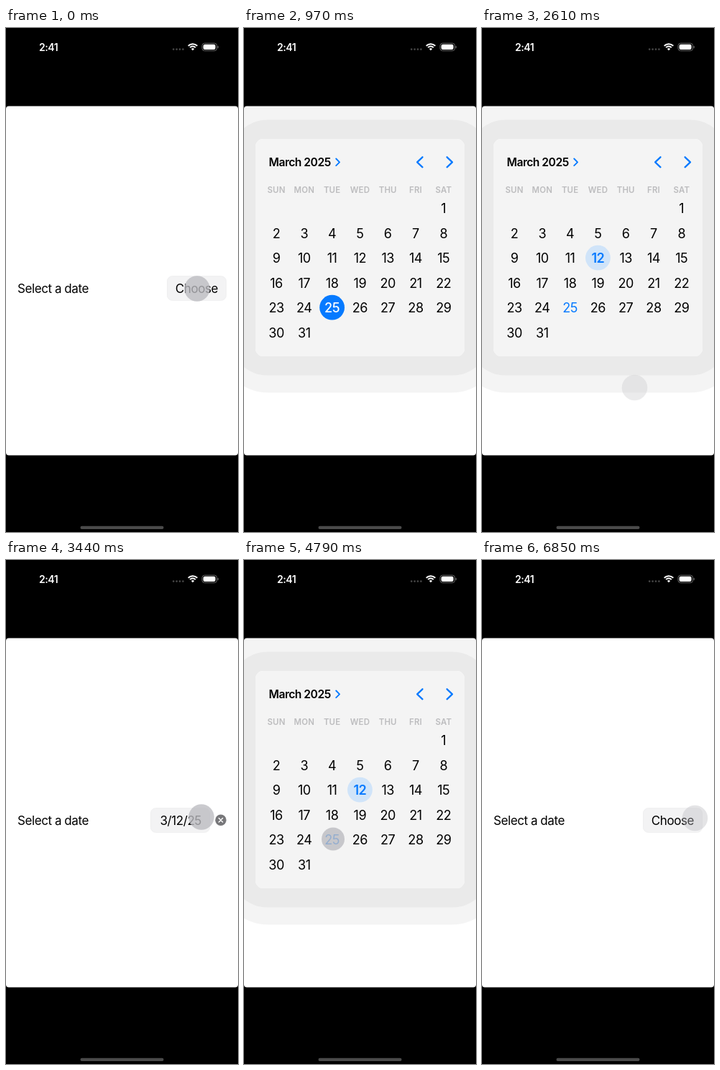
An HTML page with a canvas for the animation above (9110 ms loop, 323 by 700 pixels).

```html
<!DOCTYPE html>
<html lang="en">
<head>
<meta charset="utf-8">
<title>Date picker</title>
<style>
  html, body { margin: 0; width: 100%; height: 100%; overflow: hidden; background: #000; }
  canvas { display: block; width: 323px; height: 700px; }
</style>
</head>
<body>
<canvas id="stage"></canvas>
<script>
const W = 323, H = 700, LOOP = 9110, REST = 6850;
const BLUE = '#067aff';
const FONT = 'Inter, Roboto, "Liberation Sans", sans-serif';
const canvas = document.getElementById('stage');
const ctx = canvas.getContext('2d');
const dpr = window.devicePixelRatio || 1;
canvas.width = W * dpr;
canvas.height = H * dpr;

const touches = [
  { x: 266, y: 362, from: -200, to: 330 },
  { x: 161, y: 320, from: 1500, to: 2200 },
  { x: 212.5, y: 499.5, from: 2556, to: 3180 },
  { x: 272, y: 357, from: 3260, to: 3820 },
  { x: 124, y: 387.5, from: 4420, to: 5100, r: 16 },
  { x: 199.5, y: 467, from: 5350, to: 6180 },
  { x: 296.5, y: 358.5, from: 6280, to: 6972 }
];
// The calendar opens and closes in turn
const toggles = [550, 2805, 3690, 5575];

const clamp = v => Math.max(0, Math.min(1, v));
const ramp = (t, at, span) => clamp((t - at) / span);

// 1 = folded away, 0 = fully open
function foldAt(t) {
  const i = toggles.filter(at => at <= t).length - 1;
  if (i < 0) return 1;
  const left = (1 - ramp(t, toggles[i], 420)) ** 1.6;
  return i % 2 ? 1 - left : left;
}

// Parabola through a at 0, b at .5 and c at 1
function curve(p, a, b, c) {
  return a * (1 - p) * (1 - 2 * p) + b * 4 * p * (1 - p) + c * p * (2 * p - 1);
}

function box(x, y, w, h, r, fill, stroke) {
  ctx.beginPath();
  ctx.roundRect(x, y, w, h, r);
  if (fill) { ctx.fillStyle = fill; ctx.fill(); }
  if (stroke) { ctx.strokeStyle = stroke; ctx.lineWidth = 1; ctx.stroke(); }
}

function disc(x, y, r, fill) {
  ctx.beginPath();
  ctx.arc(x, y, r, 0, Math.PI * 2);
  ctx.fillStyle = fill;
  ctx.fill();
}

function stroke(color, width) {
  ctx.strokeStyle = color;
  ctx.lineWidth = width;
  ctx.lineCap = ctx.lineJoin = 'round';
  ctx.stroke();
}

// dir 1 points right, -1 left
function chevron(x, y, w, h, dir, width) {
  ctx.beginPath();
  ctx.moveTo(x - dir * w, y - h);
  ctx.lineTo(x + dir * w, y);
  ctx.lineTo(x - dir * w, y + h);
  stroke(BLUE, width);
}

// y is the middle of the capitals
function label(str, x, y, size, color, { weight = 400, align = 'left', space = -.43 } = {}) {
  ctx.font = `${weight} ${size}px ${FONT}`;
  ctx.letterSpacing = space + 'px';
  ctx.textAlign = align;
  ctx.fillStyle = color;
  ctx.fillText(str, x, y + size * .364);
}

function statusBar() {
  label('2:41', 46, 26.5, 14, '#fff', { weight: 600 });
  for (let i = 0; i < 4; i++) disc(233.2 + i * 4.4, 29.6, 1.3, '#484848');
  ctx.strokeStyle = '#fff';
  ctx.lineCap = 'butt';
  ctx.lineWidth = 2;
  for (const r of [8.6, 5.3]) {
    ctx.beginPath();
    ctx.arc(260, 30.8, r, -Math.PI * .76, -Math.PI * .24);
    ctx.stroke();
  }
  ctx.beginPath();
  ctx.moveTo(260, 31.2);
  ctx.arc(260, 31.2, 3, -Math.PI * .75, -Math.PI * .25);
  ctx.fillStyle = '#fff';
  ctx.fill();
  box(273, 21.2, 20.6, 10.4, 3.4, null, '#6a6a6a');
  box(274.6, 22.8, 17, 7.2, 2.2, '#fff');
  box(294.6, 24.8, 1.2, 3.4, .6, '#6a6a6a');
}

function button(str, x, right) {
  box(x + .5, 344.7, right - x - 1, 33.6, 7, '#f3f3f4', '#efeff0');
  label(str, right - 12, 362, 17, '#000', { align: 'right' });
}

function clearButton(x, y, arm) {
  disc(x, y, 7.7, '#77777a');
  ctx.beginPath();
  for (const k of [-arm, arm]) {
    ctx.moveTo(x - arm, y - k);
    ctx.lineTo(x + arm, y + k);
  }
  stroke('#fff', 1.4);
}

function sheet() {
  ctx.beginPath();
  ctx.roundRect(0, 108.5, W, 485, 4);
}

function page(day, dateOn) {
  sheet();
  ctx.fillStyle = '#fff';
  ctx.fill();
  label('Select a date', 16, 362, 17, '#000');
  ctx.globalAlpha = 1 - dateOn;
  button('Choose', 224, 307);
  ctx.globalAlpha = dateOn;
  button(`3/${day}/25`, day === 12 ? 201 : 198, 284);
  clearButton(299, 361.3, 2.7);
  ctx.globalAlpha = 1;
}

function month(selected) {
  label('March 2025', 34.5, 186.3, 15.6, '#000', { weight: 600, space: -.48 });
  chevron(130.6, 186.3, 2.4, 4.8, 1, 1.9);
  chevron(244.8, 186.3, 3.7, 7, -1, 2.3);
  chevron(286.3, 186.3, 3.7, 7, 1, 2.3);
  const colX = c => 45 + c * 38.8;
  'SUN MON TUE WED THU FRI SAT'.split(' ').forEach((name, c) =>
    label(name, colX(c), 225, 11.4, '#bcbcbe', { weight: 600, align: 'center', space: .2 }));
  for (let d = 1; d <= 31; d++) {
    const cell = d + 5;
    const x = colX(cell % 7), y = 250.5 + Math.floor(cell / 7) * 34.5;
    const today = d === 25, on = d === selected;
    if (on) disc(x, y - .3, 17.4, today ? BLUE : '#d0e4f9');
    const color = on && today ? '#fff' : on || today ? BLUE : '#000';
    label(String(d), x, y, 18, color, { weight: on ? (today ? 500 : 600) : 400, align: 'center' });
  }
}

function calendar(p, day) {
  if (p >= 1) return;
  const x = curve(p, 16, 99, 150), y = curve(p, 154, 281.5, 345);
  const w = curve(p, 291, 171, 100), h = curve(p, 302, 101, 34);
  const s = w / 291, r = 11 * s;

  ctx.save();
  sheet();
  ctx.clip();

  // Stepped shadow around the panel
  const ring = (px, py, rad, alpha) => {
    ctx.beginPath();
    ctx.roundRect(x - px, y - py, w + 2 * px, h + 2 * py, rad);
    ctx.roundRect(x, y, w, h, r);
    ctx.fillStyle = `rgba(0,0,0,${clamp(alpha)})`;
    ctx.fill('evenodd');
  };
  ring(52 * s, 50.5 * s, 70 * s, .043 * (1 - 2 * p));
  ring(curve(p, 34, 12, 4), curve(p, 26.5, 12, 4), curve(p, 50, 17, 8), curve(p, .041, .047, 0));

  ctx.globalAlpha = 1 - p;
  const shade = Math.round(244 + 11 * clamp(2 * p));
  box(x, y, w, h, r, `rgb(${shade},${shade},${shade})`);
  ctx.clip();
  ctx.translate(x, y);
  ctx.scale(s, s);
  ctx.translate(-16, -154);
  month(day);
  ctx.restore();
}

function draw(t) {
  const day = t >= 1960 && t < 4862 ? 12 : 25;
  ctx.setTransform(dpr, 0, 0, dpr, 0, 0);
  ctx.globalAlpha = 1;
  ctx.fillStyle = '#000';
  ctx.fillRect(0, 0, W, H);
  statusBar();
  page(day, ramp(t, 170, 160) - ramp(t, 6440, 160));
  calendar(foldAt(t), day);
  for (const { x, y, from, to, r = 17.8 } of touches) {
    const a = Math.min(ramp(t, from, 140), 1 - ramp(t, to - 240, 240));
    disc(x, y, r, `rgba(188,188,193,${.78 * a})`);
  }
  box(103.5, 691.8, 116, 4.2, 2.1, '#4b4b4b');
}

const start = performance.now();
function tick() {
  draw(Math.min((performance.now() - start) % LOOP, REST));
  requestAnimationFrame(tick);
}
tick();
</script>
</body>
</html>
```
